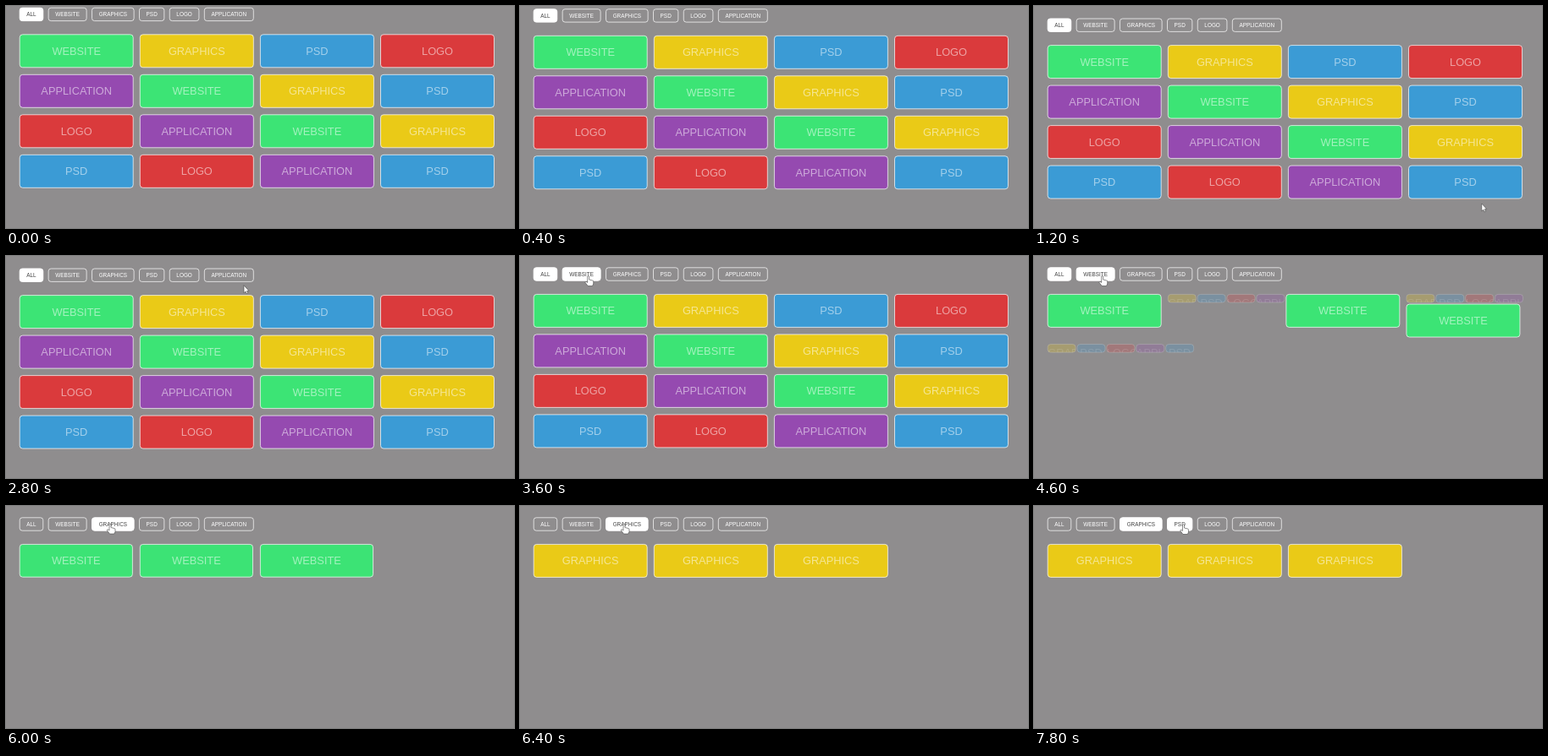
Animation of 600 by 263 pixels, one loop 8 s. Source, as an HTML page with a canvas:

```html
<!DOCTYPE html>
<html>
<head>
<meta charset="utf-8">
<style>
  html, body { margin: 0; width: 100%; height: 100%; overflow: hidden; background: #8f8d8e; }
  canvas { display: block; }
</style>
</head>
<body>
<canvas id="stage" width="600" height="263"></canvas>
<script>
const ctx = document.getElementById('stage').getContext('2d');
const LOOP = 8000, STEP = 100, FADE = 400;
const LEFT = 16.2, TOP = 46.6, PITCH_X = 142.1, PITCH_Y = 47.5, TILE_W = 134, TILE_H = 39;
const FONT = '"Liberation Sans", Arial, sans-serif';

const COLORS = {
  WEBSITE: '#3ce475', GRAPHICS: '#eaca17', PSD: '#3b9bd5',
  LOGO: '#da3a3c', APPLICATION: '#954ab0'
};
const CATEGORIES = Object.keys(COLORS);
const TILES = Array.from({ length: 16 }, (_, i) => i < 15 ? CATEGORIES[i % 5] : 'PSD');

// Clicks on the filter bar; the highlight follows at its own time.
const FILTERS = [
  { at: 0, lit: 0, name: 'ALL' },
  { at: 4332, lit: 4650, name: 'WEBSITE' },
  { at: 5980, lit: 5980, name: 'GRAPHICS' }
];

// Keyframes: [time, ...values]
const SCROLL = [[200, -12.8], [1100, 0], [2800, 0], [3500, -1.2]];
const POINTER = [
  [1100, 529, 234], [1400, 528, 236], [1700, 528, 236], [1850, 531, 239],
  [2600, 281, 35.2], [2800, 281, 35.2], [3500, 80.7, 24],
  [4900, 80.7, 24], [5600, 123, 21.5], [7200, 123, 21.5], [7800, 176.5, 22]
];
const POINTER_IN = 900;

const swing = p => 0.5 - Math.cos(Math.PI * Math.min(1, Math.max(0, p))) / 2;

function sample(keys, t) {
  const next = keys.findIndex(k => k[0] > t);
  if (next === 0) return keys[0].slice(1);
  if (next < 0) return keys[keys.length - 1].slice(1);
  const a = keys[next - 1], b = keys[next];
  const p = swing((t - a[0]) / (b[0] - a[0]));
  return a.slice(1).map((v, i) => v + (b[i + 1] - v) * p);
}

function tileScale(category, t) {
  const index = FILTERS.findLastIndex(f => f.at <= t);
  const shown = i => ['ALL', category].includes(FILTERS[i].name) ? 1 : 0;
  const from = shown(Math.max(0, index - 1)), to = shown(index);
  return from + (to - from) * swing((t - FILTERS[index].at) / FADE);
}

// Left-float layout: each box sits beside the earlier ones or drops below them.
function layout(t) {
  const placed = [];
  let y = 0;
  for (const category of TILES) {
    const scale = tileScale(category, t);
    if (scale < 0.002) continue;
    const w = PITCH_X * scale, h = PITCH_Y * scale;
    let x;
    for (;;) {
      const beside = placed.filter(b => b.y + b.h > y + 0.01);
      x = Math.max(0, ...beside.map(b => b.x + b.w));
      if (x + w <= PITCH_X * 4 + 0.1 || !beside.length) break;
      y = Math.min(...beside.map(b => b.y + b.h));
    }
    placed.push({ category, scale, x, y, w, h });
  }
  return placed;
}

function roundBox(x, y, w, h, r) {
  ctx.beginPath();
  ctx.roundRect(x, y, w, h, r);
}

function drawTile({ category, scale, x, y }, top) {
  const w = TILE_W * scale, h = TILE_H * scale;
  ctx.save();
  ctx.translate(LEFT + x, top + y);
  ctx.globalAlpha = scale;
  roundBox(0, 0, w, h, 3.5);
  ctx.fillStyle = COLORS[category];
  ctx.fill();
  ctx.strokeStyle = 'rgba(255,255,255,.7)';
  ctx.stroke();
  ctx.clip();
  ctx.font = '12.8px ' + FONT;
  ctx.fillStyle = 'rgba(255,255,255,.53)';
  const textX = Math.max(0, (w - ctx.measureText(category).width) / 2);
  ctx.fillText(category, textX, 12 * scale + 11.9);
  ctx.restore();
}

function barButtons() {
  ctx.font = '6.4px ' + FONT;
  let x = LEFT;
  return ['ALL', ...CATEGORIES].map(name => {
    const w = ctx.measureText(name).width + 16.8;
    const button = { name, x, w };
    x += w + 5.8;
    return button;
  });
}

function drawButton({ name, x, w }, y, lit) {
  roundBox(x, y, w - 0.6, 15.4, 3);
  if (lit) {
    ctx.fillStyle = '#fff';
    ctx.fill();
  }
  ctx.strokeStyle = lit ? '#fff' : 'rgba(255,255,255,.7)';
  ctx.stroke();
  ctx.font = '6.4px ' + FONT;
  ctx.fillStyle = lit ? '#444' : '#fff';
  ctx.fillText(name, x + 8.1, y + 10);
}

function drawCursor(x, y, outline) {
  ctx.save();
  ctx.translate(x, y);
  ctx.fillStyle = '#fff';
  ctx.strokeStyle = '#444';
  ctx.lineWidth = 0.6;
  ctx.lineJoin = 'round';
  const shape = new Path2D(outline);
  ctx.fill(shape);
  ctx.stroke(shape);
  ctx.restore();
}
const ARROW = 'M0-.5V8.5L2 6.8 3.2 9.5 4.7 8.8 3.5 6.2H6Z';
const HAND = 'M-1 0Q0-1 1 0V4L5 5Q6 5 6 6.5V9L4.8 11.5H-.5L-3.6 7.5Q-3.8 6-2.4 6.4L-1 7.4Z';

function draw(t) {
  const [scroll] = sample(SCROLL, t);
  const [px, py] = sample(POINTER, t);
  const barY = 15 + scroll;
  ctx.fillStyle = '#8f8d8e';
  ctx.fillRect(0, 0, 600, 263);
  ctx.lineWidth = 1;

  layout(t).forEach(tile => drawTile(tile, TOP + scroll));

  const active = FILTERS.findLast(f => f.lit <= t).name;
  const present = t >= POINTER_IN;
  let overButton = false;
  for (const button of barButtons()) {
    const over = present && px >= button.x && px <= button.x + button.w &&
      py >= barY && py <= barY + 15.4;
    overButton ||= over;
    drawButton(button, barY, over || button.name === active);
  }
  if (present) drawCursor(px, py, overButton ? HAND : ARROW);
}

const start = performance.now();
function tick() {
  const t = (performance.now() - start) % LOOP;
  draw(Math.floor(t / STEP) * STEP);
  requestAnimationFrame(tick);
}
tick();
</script>
</body>
</html>
```
